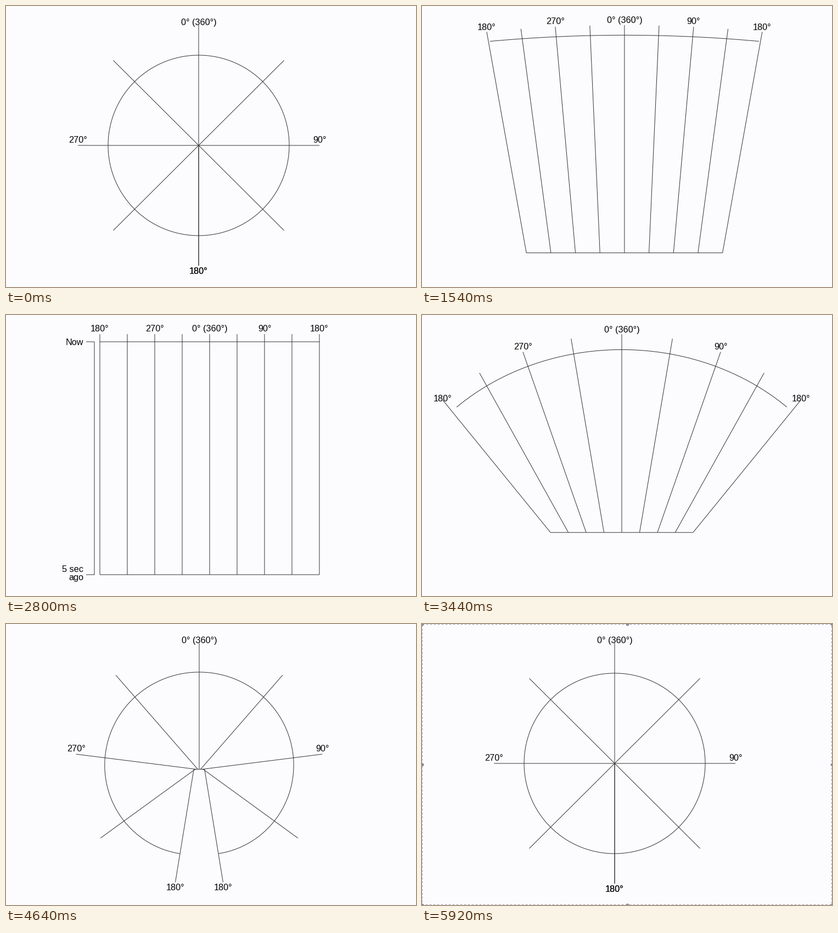
Animation of 747 by 514 pixels, one loop 5.98 s. Source, as a matplotlib script:

```python
import numpy as np
import matplotlib.pyplot as plt
from matplotlib.animation import FuncAnimation

W, H, DPI = 747, 514, 64
PX = 72 / DPI                      # points per pixel
STEP, LOOP = 20, 5980              # ms
UNROLL, ROLL, SPAN = 278, 3118, 2400
SELECTED = 5920
INK, AXIS_X = "#333333", 161

fig = plt.figure(figsize=(W / DPI, H / DPI), dpi=DPI, facecolor="#fcfcfe")
ax = fig.add_axes([0, 0, 1, 1])
ax.set(xlim=(0, W), ylim=(H, 0))
ax.axis("off")


def stroke(x=(), y=(), color=INK, width=1, **kw):
    line, = ax.plot(x, y, color=color, lw=width * PX, snap=False,
                    solid_capstyle="butt", **kw)
    return line


def label(text, x=0, y=0, ha="center"):
    return ax.text(x, y, text, ha=ha, va="baseline", color="black",
                   fontname="Liberation Sans", fontsize=16.2 * PX)


def ease_out(t):
    return 1 - (1 - np.clip(t, 0, 1)) ** 3


def unrolled(ms):
    """0 = polar, 1 = rectangular."""
    return ease_out((ms - UNROLL) / SPAN) - ease_out((ms - ROLL) / SPAN)


def project(k, r, p):
    """Point at bearing k * 180 degrees and radius r, partly unrolled."""
    a = np.pi * k * (1 - p)
    return 351 + 20 * p + 200 * p * k + r * np.sin(a), 255 - r * np.cos(a)


SPOKES = np.linspace(-1, 1, 9)
ARC = np.linspace(-1, 1, 241)

spokes = [stroke() for _ in SPOKES]
arc, base = stroke(), stroke()

# bearing, text, baseline offset from the spoke end in the polar state
names = [(k, label(s), off) for k, s, off in [
    (-1, "180°", 15.5), (-0.5, "270°", -5), (0, "0° (360°)", 0),
    (0.5, "90°", -5), (1, "180°", 15.5)]]

time_axis = [
    stroke([AXIS_X - 15, AXIS_X, AXIS_X, AXIS_X - 15], [49, 49, 475, 475]),
    label("Now", 141, 55, "right"),
    label("5 sec", 141, 470, "right"),
    label("ago", 141, 485, "right"),
]

selection = [
    stroke([0.5, W - 0.5, W - 0.5, 0.5, 0.5], [0.5, 0.5, H - 0.5, H - 0.5, 0.5],
           color="#9a9aa4", dashes=(4, 3)),
    stroke([0, W / 2, W, 0, W, 0, W / 2, W],
           [0, 0, 0, H / 2, H / 2, H, H, H],
           color="#8888a0", ls="none", marker="o", ms=6 * PX, mew=0),
]


def draw(i):
    ms = i * STEP
    p = unrolled(ms)
    floor = 255 + 220 * p
    mid = 351 + 20 * p

    for k, line in zip(SPOKES, spokes):
        x, y = project(k, 220, p)
        line.set_data([mid + 200 * p * k, x], [floor, y])
    arc.set_data(*project(ARC, 165 + 41 * p, p))
    base.set_data([mid - 200 * p, mid + 200 * p], [floor, floor])

    for k, text, off in names:
        x, y = project(k, 220, p)
        text.set_position((x, y + off + (-5 - off) * p))

    fade = np.clip((p - 0.9) / 0.1, 0, 1)
    for part in time_axis:
        part.set_alpha(fade)
    for part in selection:
        part.set_visible(ms >= SELECTED)
    return []


anim = FuncAnimation(fig, draw, frames=LOOP // STEP, interval=STEP,
                     repeat=True, repeat_delay=0, blit=False)
plt.show()
```
